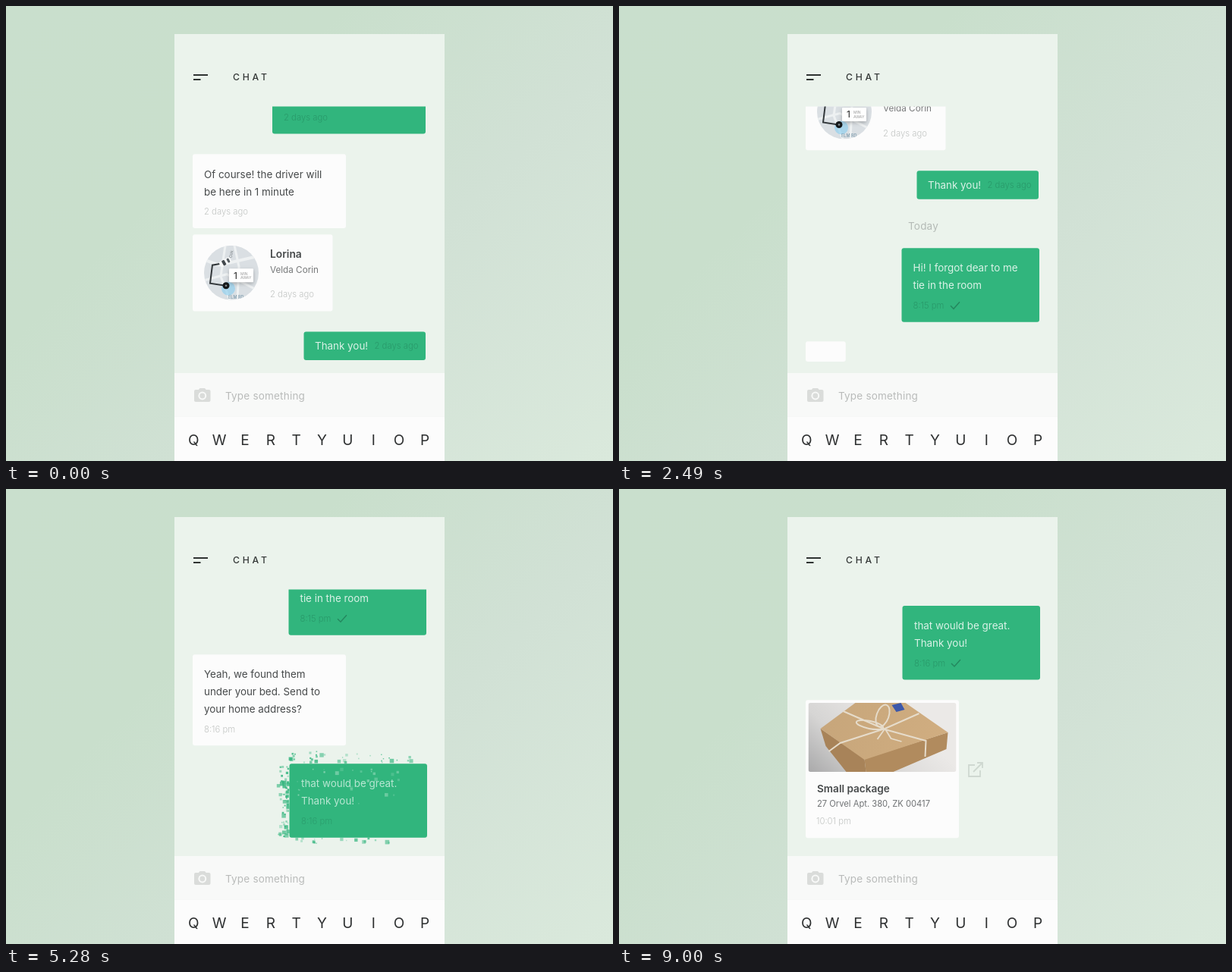
Recreate the animation shown at these times as an HTML page with a canvas. Size 800x600 px, loop 9.06 s.

```html
<!DOCTYPE html>
<html lang="en">
<head>
<meta charset="utf-8">
<title>Chat</title>
<style>
html, body { margin: 0; width: 100%; height: 100%; overflow: hidden; background: #cfe1d2; }
canvas { display: block; width: 800px; height: 600px; }
</style>
</head>
<body>
<canvas id="stage" width="800" height="600"></canvas>
<script>
const ctx = document.getElementById('stage').getContext('2d');
const LOOP = 9060, TICK = 30;
const GREEN = '#31b57d', WHITE = '#fcfcfc', PANEL = '#ebf3ec', DARK = '#474a4b';
const FAMILY = 'Inter, "Open Sans", sans-serif';

const clamp = v => Math.max(0, Math.min(1, v));
const span = (t, from, dur) => clamp((t - from) / dur);
const quad = p => p < .5 ? 2 * p * p : 1 - 2 * (1 - p) ** 2;
const cubic = p => p < .5 ? 4 * p ** 3 : 1 - 4 * (1 - p) ** 3;
const out = p => 1 - (1 - p) ** 3;

function random(seed) {
  return () => {
    seed = (seed * 1664525 + 1013904223) >>> 0;
    return seed / 4294967296;
  };
}

// Scroll steps: start time and distance
const SCROLLS = [[1220, 169], [2270, 68], [3010, 77], [4910, 122.5], [6510, 68.7], [7480, 139.5]];
const scrollAt = t => SCROLLS.reduce((s, [from, dist]) => s + dist * cubic(span(t, from, 400)), 0);

function box(x, y, w, h, color, r = 3) {
  ctx.fillStyle = color;
  ctx.beginPath();
  ctx.roundRect(x, y, w, h, Math.min(r, w / 2, h / 2));
  ctx.fill();
}

function disc(x, y, r, color) {
  ctx.fillStyle = color;
  ctx.beginPath();
  ctx.arc(x, y, r, 0, 7);
  ctx.fill();
}

function path(points, close) {
  ctx.beginPath();
  points.forEach(([x, y]) => ctx.lineTo(x, y));
  if (close) ctx.closePath();
}

function poly(points, color) {
  path(points, true);
  ctx.fillStyle = color;
  ctx.fill();
}

function line(points, color, width) {
  path(points);
  ctx.strokeStyle = color;
  ctx.lineWidth = width;
  ctx.stroke();
}

function text(str, x, y, size, color, weight = 400, spacing = 0) {
  ctx.font = `${weight} ${size}px ${FAMILY}`;
  ctx.letterSpacing = spacing + 'px';
  ctx.fillStyle = color;
  ctx.fillText(str, x, y);
}

function faded(alpha, draw) {
  if (alpha <= 0) return;
  ctx.save();
  ctx.globalAlpha *= alpha;
  draw();
  ctx.restore();
}

const body = (str, x, y, color = DARK) => text(str, x, y, 13.4, color);
const stamp = (str, x, y, color = '#c3c6c4') => text(str, x, y, 11.3, color, 300);
const onGreen = '#daf2e7', stampGreen = '#29996a';

function check(x, y) {
  line([[x, y], [x + 4, y + 4], [x + 12, y - 5]], '#24895f', 1.5);
}

// Square fragments leaving the left, top and bottom edges
function burst(x, y, w, h, color, inner, age, seed, count) {
  if (age <= 0 || age > 650) return;
  const rnd = random(seed);
  for (let i = 0; i < count; i++) {
    const side = rnd(), along = rnd(), reach = rnd() ** 1.6, size = 1.5 + 5 * rnd() ** 1.5;
    const life = 320 + 330 * rnd(), shade = .3 + .65 * rnd(), drift = (rnd() - .5) * 8;
    const p = age / life;
    if (p >= 1) continue;
    const d = (2 + 15 * reach) * out(clamp(p * 1.8)), slide = drift * p;
    let px, py;
    if (side < .42) { px = x - d; py = y + along * h + slide; }
    else if (side < .68) { px = x + along ** 1.4 * w * .9 + slide; py = y - d; }
    else if (side < .82) { px = x + along * w * .8 + slide; py = y + h + d * .5; }
    else { px = x + w * (.05 + along * .75) + slide; py = y + h * (.08 + .5 * reach) - d * .3; }
    const s = size * (1 - .5 * p);
    ctx.globalAlpha = shade * (1 - p * p);
    ctx.fillStyle = side < .82 ? color : inner;
    ctx.fillRect(px - s / 2, py - s / 2, s, s);
  }
  ctx.globalAlpha = 1;
}

function map(cx, cy) {
  ctx.save();
  ctx.translate(cx, cy);
  ctx.beginPath();
  ctx.arc(0, 0, 36, 0, 7);
  ctx.clip();
  ctx.fillStyle = '#dadfe3';
  ctx.fillRect(-36, -36, 72, 72);
  line([[-36, -17], [-16, -10], [36, -22]], '#eef1f2', 4);
  line([[-8, -36], [-14, 5], [-2, 36]], '#eef1f2', 3);
  line([[-36, 10], [-6, 2], [36, 24]], '#eef1f2', 3);
  line([[4, -36], [10, -8], [8, 36]], '#eef1f2', 3);
  disc(-4, 21, 9, 'rgba(135,205,240,.6)');
  line([[-8, -13], [-25, -10], [-28, 14], [-8, 17]], '#33383b', 2);
  disc(-7, 17, 4.5, '#15181a');
  disc(-7, 17, 1.3, '#8b9194');
  ctx.save();
  ctx.translate(-8, -14);
  ctx.rotate(-.5);
  box(-8, -4, 16, 8, '#f8f9f9', 3);
  box(-4, -3.5, 4, 7, '#43494d', 1);
  box(3, -3, 3, 6, '#596065', 1);
  ctx.restore();
  text('ELM RD', -4, 34, 5.5, '#7c9aac', 500);
  ctx.save();
  ctx.translate(2, -27);
  ctx.rotate(-1.4);
  text('Oak', -8, 0, 5.5, '#82898d');
  ctx.restore();
  ctx.restore();
  ctx.save();
  ctx.shadowColor = 'rgba(0,0,0,.25)';
  ctx.shadowBlur = 5;
  ctx.shadowOffsetY = 2;
  box(cx - 3, cy - 5.5, 32, 18, '#fff', 1);
  ctx.restore();
  text('1', cx + 3, cy + 8, 12, '#444', 500);
  text('MIN', cx + 12, cy + 3, 5, '#999');
  text('AWAY', cx + 12, cy + 8.5, 5, '#999');
}

function parcel(x, y) {
  ctx.save();
  ctx.translate(x, y);
  ctx.beginPath();
  ctx.roundRect(0, 0, 195, 91, 3);
  ctx.clip();
  const bg = ctx.createLinearGradient(0, 91, 90, -10);
  bg.addColorStop(0, '#a9a9aa');
  bg.addColorStop(.45, '#d6d5d4');
  bg.addColorStop(1, '#ebe9e7');
  ctx.fillStyle = bg;
  ctx.fillRect(0, 0, 195, 91);
  poly([[16, 34], [74, 74], [76, 91], [50, 91], [23, 57]], '#a88359');
  poly([[74, 74], [184, 39], [182, 61], [112, 91], [76, 91]], '#b18b5e');
  const top = ctx.createLinearGradient(20, 20, 170, 60);
  top.addColorStop(0, '#c7a67b');
  top.addColorStop(1, '#d0ad80');
  poly([[16, 34], [62, 0], [128, 0], [184, 39], [74, 75]], top);
  const string = '#e6dccb';
  line([[46, 11], [101, 35], [155, 50], [154, 71]], string, 2);
  line([[27, 64], [42, 53], [101, 34], [146, 14]], string, 2);
  ctx.strokeStyle = string;
  ctx.beginPath();
  ctx.ellipse(98, 17, 8, 15, .35, 0, 7);
  ctx.stroke();
  ctx.beginPath();
  ctx.ellipse(81, 29, 18, 5, .2, 0, 7);
  ctx.stroke();
  line([[101, 34], [109, 47], [123, 51]], string, 1.8);
  line([[101, 34], [91, 48]], string, 1.8);
  poly([[110, 3], [122, 0], [127, 9], [116, 12]], '#3d58a9');
  ctx.restore();
}

function hi(x, y) {
  body('Hi! I forgot dear to me', x + 15, y + 31, onGreen);
  body('tie in the room', x + 15, y + 53.7, onGreen);
  stamp('8:15 pm', x + 15, y + 79.5, stampGreen);
}

function yeah(x, y) {
  body('Yeah, we found them', x + 15, y + 31);
  body('under your bed. Send to', x + 15, y + 53.7);
  body('your home address?', x + 15, y + 76.5);
  stamp('8:16 pm', x + 15, y + 102.5);
}

function great(x, y) {
  body('that would be great.', x + 15.5, y + 31, onGreen);
  body('Thank you!', x + 15.5, y + 53.7, onGreen);
  stamp('8:16 pm', x + 15.5, y + 79.5, stampGreen);
}

function delivery(x, y) {
  parcel(x + 3.5, y + 3.7);
  text('Small package', x + 15, y + 121.5, 13.6, DARK, 600);
  text('27 Orvel Apt. 380, ZK 00417', x + 15, y + 140.3, 11.2, '#6f7274');
  stamp('10:01 pm', x + 14, y + 164);
}

const MESSAGES = [
  { x: 372.5, y: 531.5, w: 181.5, h: 97.5, born: 1420, rest: 169, mine: true, draw: hi },
  { x: 246, y: 654.5, w: 202, h: 120, born: 3210, rest: 314, draw: yeah },
  { x: 373.5, y: 798.7, w: 181.5, h: 97.5, born: 5110, rest: 436.5, mine: true, draw: great },
  { x: 246, y: 923, w: 202, h: 182, born: 7680, rest: 644.7, draw: delivery }
];

function message(m, t, scroll, i) {
  const age = t - m.born;
  if (age <= 0) return;
  const grow = quad(span(age, 0, 150));
  const y = m.y - scroll - .62 * Math.max(0, m.rest - scroll);
  const w = m.w * grow, h = m.h * (.86 + .14 * grow);
  const x = m.mine ? m.x + m.w - w : m.x;
  const top = y + (m.h - h) / 2;
  box(x, top, w, h, m.mine ? GREEN : WHITE);
  const show = m.mine ? span(age, 90, 100) : span(age, 195, 300);
  faded(show, () => {
    ctx.beginPath();
    ctx.rect(x, top, w, h);
    ctx.clip();
    m.draw(m.x, y);
  });
  if (m.mine) faded(span(age, 600, 90), () => check(m.x + 64.5, y + 76));
  burst(x, top, w, h, m.mine ? GREEN : '#fafcfa', m.mine ? '#8fd8b7' : '#fff', age - 50, 71 + i * 37, m.mine ? 150 : 110);
}

function typing(t, scroll, from, until, y0, seed) {
  const p = cubic(span(t, from, 400)) * (1 - quad(span(t, until, 327)));
  const y = y0 - scroll;
  if (p > 0) box(246, y, 83 * p, 42 * p, WHITE);
  faded(clamp((p - .75) * 4), () => {
    for (let i = 0; i < 3; i++) {
      const lift = Math.max(0, Math.sin((t - from) / 95 - i * .9)) * 4;
      disc(246 + 20 + i * 21, y + 22 - lift, 4, '#c9d0cb');
    }
  });
  burst(246, y, 61, 33, '#f8fbf8', '#fff', t - until - 20, seed, 42);
}

function history(scroll) {
  ctx.save();
  ctx.translate(0, -scroll);
  box(351, 70, 202, 98.5, GREEN);
  stamp('2 days ago', 366, 151, stampGreen);

  box(246, 195.3, 202, 97.7, WHITE);
  body('Of course! the driver will', 261, 227);
  body('be here in 1 minute', 261, 249.5);
  stamp('2 days ago', 261, 275);

  box(246, 301.3, 184.5, 101.2, WHITE);
  map(297, 351.7);
  text('Lorina', 348, 332.3, 13.8, DARK, 600);
  text('Velda Corin', 348, 351.5, 11.7, '#77797a');
  stamp('2 days ago', 348, 384.3);

  box(392.5, 429.5, 160.5, 37.5, GREEN);
  body('Thank you!', 407, 453, onGreen);
  stamp('2 days ago', 485.5, 452, stampGreen);
  ctx.restore();
}

function shareIcon(x, y) {
  const c = '#cfd8d1';
  line([[x + 9, y + 3], [x + 1, y + 3], [x + 1, y + 18], [x + 16, y + 18], [x + 16, y + 10]], c, 1.8);
  line([[x + 7, y + 12], [x + 19, y]], c, 1.8);
  line([[x + 12, y], [x + 19, y], [x + 19, y + 7]], c, 1.8);
}

function draft(t, start, str) {
  const typed = str.slice(0, Math.ceil(str.length * span(t, start, 640)));
  if (t >= start && t < start + 740) {
    ctx.save();
    ctx.beginPath();
    ctx.rect(286, 486, 240, 54);
    ctx.clip();
    ctx.font = `400 13.4px ${FAMILY}`;
    ctx.letterSpacing = '0px';
    const over = Math.max(0, ctx.measureText(typed).width - 236);
    body(typed, 289 - over, 518.5);
    ctx.restore();
  }
  const s = out(span(t, start, 180)) * (1 - quad(span(t, start + 740, 150)));
  if (s <= 0) return;
  ctx.save();
  ctx.translate(553, 514);
  ctx.scale(s, s);
  disc(0, 0, 19.5, GREEN);
  poly([[-7, -7], [9, 0], [-7, 7], [-7, 1.5], [2, 0], [-7, -1.5]], '#fff');
  ctx.restore();
}

function inputBar(t) {
  ctx.fillStyle = '#f8f9f8';
  ctx.fillRect(222, 484, 356, 57.5);
  box(248, 506, 21.5, 16, '#dadcda', 2);
  poly([[253, 507], [255.5, 504], [262, 504], [264.5, 507]], '#dadcda');
  disc(258.8, 514, 5.4, '#f8f9f8');
  disc(258.8, 514, 3.4, '#dadcda');
  const hint = [480, 4170].reduce((a, s) =>
    t >= s && t < s + 1100 ? span(t, s + 860, 200) : a, 1);
  faded(hint, () => text('Type something', 289, 518.5, 13.5, '#b9bbba', 400, .2));
  draft(t, 480, 'Hi! I forgot dear to me tie in the room');
  draft(t, 4170, 'that would be great. Thank you!');
}

function keyboard() {
  ctx.fillStyle = '#fcfcfc';
  ctx.fillRect(222, 541.5, 356, 58.5);
  ctx.textAlign = 'center';
  [...'QWERTYUIOP'].forEach((key, i) => text(key, 247.3 + i * 33.85, 579.3, 19, '#2e3031'));
  ctx.textAlign = 'left';
}

function backdrop() {
  const bg = ctx.createLinearGradient(50, -50, 750, 650);
  bg.addColorStop(0, '#c9dfcd');
  bg.addColorStop(.32, '#c9dfcc');
  bg.addColorStop(.62, '#d1e1d5');
  bg.addColorStop(1, '#dae9dc');
  ctx.fillStyle = bg;
  ctx.fillRect(0, 0, 800, 600);
  ctx.fillStyle = PANEL;
  ctx.fillRect(222, 37, 356, 563);
  ctx.fillStyle = '#2f3332';
  ctx.fillRect(247, 90, 19, 2);
  ctx.fillRect(247, 96, 9.5, 2);
  text('CHAT', 299, 97.5, 12.2, '#333736', 500, 3.8);
}

function render(t) {
  const scroll = scrollAt(t);
  backdrop();
  ctx.save();
  ctx.beginPath();
  ctx.rect(222, 132.5, 356, 351.5);
  ctx.clip();
  history(scroll);
  faded(span(t, 1560, 250), () => text('Today', 381, 507.2 - scroll, 13.5, '#b4bab6', 400, .2));
  typing(t, scroll, 2270, 2880, 654.5, 19);
  typing(t, scroll, 6510, 7350, 922.5, 43);
  MESSAGES.forEach((m, i) => message(m, t, scroll, i));
  faded(span(t, 8050, 200), () => shareIcon(460, 1005.7 - scroll));
  ctx.restore();
  inputBar(t);
  keyboard();
}

const began = performance.now();
function frame() {
  const t = (performance.now() - began) % LOOP;
  render(Math.floor(t / TICK) * TICK);
  requestAnimationFrame(frame);
}
frame();
</script>
</body>
</html>
```
